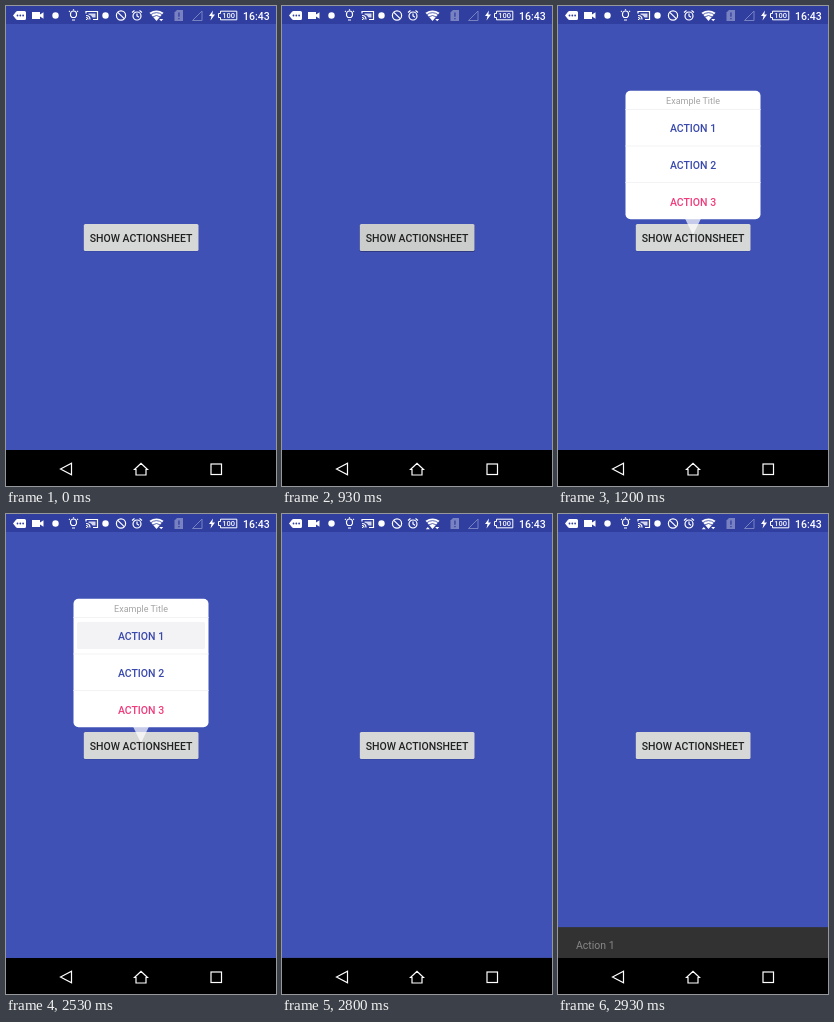
An HTML page for the animation above (2.99 s loop, 270 by 480 pixels).

```html
<!DOCTYPE html>
<html lang="en">
<head>
<meta charset="utf-8">
<title>Action sheet</title>
<style>
  html, body { margin: 0; width: 100%; height: 100%; overflow: hidden; background: #000; }
  svg { display: block; width: 100vw; height: 100vh; font-family: Roboto, "Noto Sans", sans-serif; font-size: 10.5px; }
  .mid { text-anchor: middle; }
  .strong { font-weight: 500; }
  .line { fill: none; stroke: #fff; stroke-width: 1.2; }
</style>
</head>
<body>
<svg viewBox="0 0 270 480">
  <rect width="270" height="444" fill="#3f51b5"/>
  <rect width="270" height="18" fill="#303f9f"/>

  <!-- status bar -->
  <g fill="#fff">
    <path d="M7 9.5l3-3.7q.6-.8 1.5-.8H18.500q1.500 0 1.500 1.500v6q0 1.500-1.500 1.500H11.500q-.9 0-1.500-.8z"/>
    <g fill="#303f9f"><circle cx="11.500" cy="9.500" r=".9"/><circle cx="14.300" cy="9.500" r=".9"/><circle cx="17.100" cy="9.500" r=".9"/></g>
    <path d="M26 6h8v2.500l3.500-2.300v6.600L34 10.500V13h-8z"/>
    <circle cx="49.500" cy="9.500" r="3.200"/>
    <g class="line" stroke-width="1">
      <path d="M66 11.500q-2-1.500-1.500-3.500a3 3 0 0 1 6 0q.5 2-1.500 3.500zM66 14h3M67.500 3.300v1M63 5l.8.7M72 5l-.8.7"/>
      <path d="M80 7.500V5.500h11.500v8H87M80 13.500h1M80 11.500q2 0 2 2M80 9.500q4 0 4 4"/>
    </g>
    <path d="M82.500 7.500h7v4h-3q-1-2.500-4-3z" opacity=".8"/>
    <circle cx="99.500" cy="9.500" r="3.200"/>
    <g class="line">
      <circle cx="115" cy="9.500" r="4.600"/><path d="M111.800 6.300l6.400 6.400"/>
      <circle cx="131" cy="10" r="4"/><path d="M131 7.500V10l2 1.300M126 6.500l2.500-2M136 6.500l-2.500-2"/>
    </g>
    <path d="M143.500 6.800q7-4.800 14 0L150.500 15z"/>
    <path d="M144.500 8.900q6-4.500 12 0M146.500 11q4-3 8 0" fill="none" stroke="#303f9f" stroke-width=".8"/>
    <path d="M153.200 13h4l-2 2.300z"/>
    <path id="up" d="M143.800 15.200h4l-2-2.300z"/>
    <g opacity=".35">
      <path d="M171 4h6v11h-8.500V6.500z"/>
      <path d="M186.500 14.500h9.500V5z" fill="none" stroke="#fff"/>
    </g>
    <path d="M172.300 6.500h1.300v4.300h-1.300zM172.300 12h1.300v1.300h-1.300z" fill="#303f9f"/>
    <path d="M207 4.500l-4 5.500h2.500l-1 4.500 4.500-6h-2.700z"/>
    <path class="line" d="M214.500 5.200h16.300v8.600h-16.300v-2.300h-2v-4h2z" style="stroke-width:1"/>
    <text class="mid" x="222.600" y="12.200" font-size="7.500" font-weight="500">100</text>
    <text class="strong" x="237" y="13.600">16:43</text>
  </g>

  <!-- button -->
  <rect id="shade" x="77.500" y="218.500" width="115.500" height="27.500" rx="2" fill="#000" opacity=".15"/>
  <rect x="77.800" y="218" width="114.700" height="27" rx="1.500" fill="#d6d7d7"/>
  <rect id="press" x="77.800" y="218" width="114.700" height="27" rx="1.500"/>
  <text class="mid strong" x="135" y="235.500" fill="#212121">SHOW ACTIONSHEET</text>

  <!-- popup -->
  <g id="sheet">
    <path d="M127 212.500h16l-8 16.500z" fill="#fff" opacity=".7"/>
    <rect x="67.500" y="84.700" width="135" height="128.500" rx="5" fill="#fff"/>
    <path d="M67.500 103.500h135M67.500 140h135M67.500 176.500h135" stroke="#f3f3f5"/>
    <rect id="row" x="71" y="108" width="128" height="27" rx="1.500" fill="#f3f3f6"/>
    <text class="mid" x="135" y="97.500" font-size="9" fill="#a4a4a4">Example Title</text>
    <g class="mid strong" fill="#3949ab">
      <text x="135" y="126.200">ACTION 1</text>
      <text x="135" y="163">ACTION 2</text>
      <text x="135" y="199.700" fill="#f03c7c">ACTION 3</text>
    </g>
  </g>

  <!-- snackbar -->
  <g id="snack">
    <rect y="444" width="270" height="36" fill="#323232"/>
    <text id="note" x="18" y="465.700" fill="#fff">Action 1</text>
  </g>

  <!-- navigation bar -->
  <rect y="444" width="270" height="36"/>
  <g class="line">
    <path d="M54.500 463l11-5.700v11.400z"/>
    <path d="M128.500 463.500l6.500-6.200 6.500 6.200h-1.500v5.500h-10v-5.500z"/>
    <rect x="205" y="458" width="10.500" height="10.500"/>
  </g>
</svg>
<script>
const LOOP = 2990, FPS = 15;
const $ = id => document.getElementById(id);
const ramp = (t, start, length) => Math.min(1, Math.max(0, (t - start) / length));
const show = (id, opacity) => $(id).setAttribute('opacity', opacity);

// cubic-bezier(.4, 0, .2, 1)
function ease(x) {
  let lo = 0, hi = 1;
  for (let i = 0; i < 20; i++) {
    const s = (lo + hi) / 2, r = 1 - s;
    if (1.2 * r * r * s + .6 * r * s * s + s ** 3 < x) lo = s; else hi = s;
  }
  return lo * lo * (3 - 2 * lo);
}

function draw(time) {
  // the screen refreshes in steps of 1/15 s
  const t = Math.floor((time % LOOP) * FPS / 1000 + .051) * 1000 / FPS;
  const pressed = ramp(t, 600, 200) * (1 - ramp(t, 933, 260));
  show('press', .05 * pressed);
  show('shade', .08 + .2 * pressed);
  show('sheet', t < 2660 ? ramp(t, 933, 200) : 0);
  show('row', t > 2500 ? 1 : 0);
  show('up', t > 2660 ? 1 : 0);
  $('snack').setAttribute('transform', `translate(0 ${-36 * ease(ramp(t, 2789, 250))})`);
  show('note', ramp(t, 2859, 180));
}

const start = performance.now();
function tick() {
  draw(performance.now() - start);
  requestAnimationFrame(tick);
}
tick();
</script>
</body>
</html>
```
